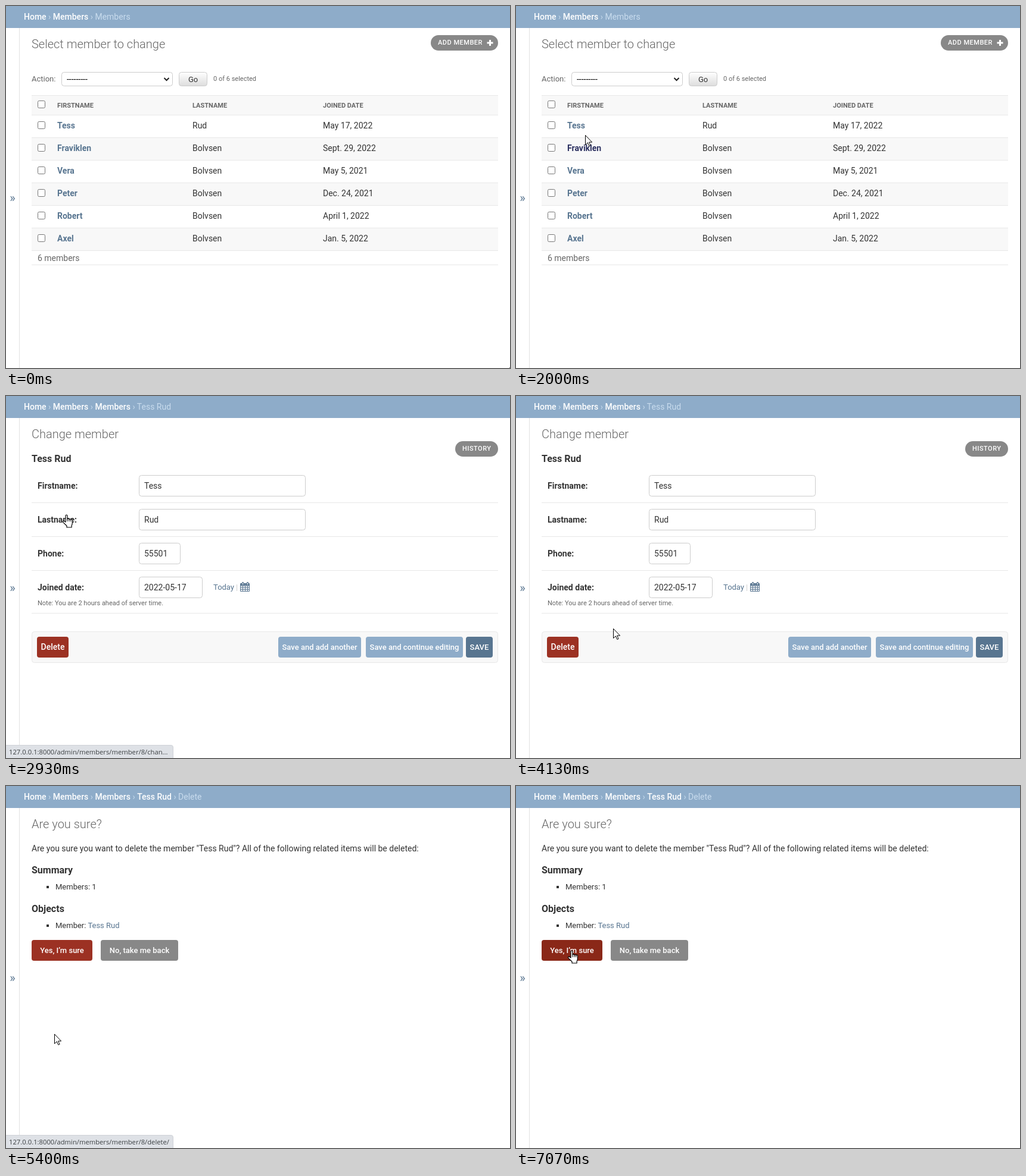
These frames come from a looping animation (846 by 609 pixels, 8000 ms). An HTML page:

```html
<!DOCTYPE html>
<html lang="en">
<head>
<meta charset="utf-8">
<title>Member admin</title>
<style>
html, body { margin: 0; width: 100%; height: 100%; overflow: hidden; background: #fff; }
svg { display: block; }
text { font-family: Roboto, sans-serif; white-space: pre; }
#status text { font-family: "Open Sans", "Noto Sans", sans-serif; }
</style>
</head>
<body>
<svg id="stage" width="846" height="609"></svg>
<script>
const BLUE = '#8eacc9', LINK = '#587590', HOVER = '#2b3060', RED = '#9c3123', DARK_RED = '#8a2818';
const GREY = '#888', INK = '#333', SOFT = '#666', PALE = '#c9dcee', LINE = '#e8e8e8', STRIPE = '#f8f8f8';
const FIRST = 'Tess', LAST = 'Rud', FULL = FIRST + ' ' + LAST;
const $ = id => document.getElementById(id);

const text = (x, y, str, size = 14, fill = INK, weight = 400, extra = '') =>
  `<text x="${x}" y="${y}" font-size="${size}" fill="${fill}" font-weight="${weight}" ${extra}>${str}</text>`;
const rect = (x, y, w, h, fill, r = 0, extra = '') =>
  `<rect x="${x}" y="${y}" width="${w}" height="${h}" fill="${fill}" rx="${r}" ${extra}/>`;
const frame = (x, y, w, h, fill = '#fff', r = 4, stroke = '#ccc') =>
  rect(x + .5, y + .5, w - 1, h - 1, fill, r, `stroke="${stroke}"`);
const rule = y => rect(43, y, 783, 1, LINE);
const title = str => text(43, 71, str, 20, SOFT, 300);
const check = y => frame(53, y, 13, 13, '#fff', 2, '#767676');
const button = (x, y, w, str, fill, size = 13, id = '') =>
  rect(x, y, w, 35, fill, 4, id && `id="${id}"`) +
  text(x + w / 2, y + 22, str, size, '#fff', 500, 'text-anchor="middle"');
const pill = (x, y, w, str) => rect(x, y, w, 26, GREY, 13) +
  text(x + 12, y + 16, str, 11, '#fff', 500, 'letter-spacing=".5"');
const crumbs = (...names) => text(30, 23, names.map((name, i) =>
  i < names.length - 1 ? `<tspan font-weight="500" fill="#fff">${name}</tspan> › ` : name).join(''), 14, PALE);

function listPage() {
  const rows = [
    [FIRST, LAST, 'May 17, 2022'], ['Fraviklen', 'Bolvsen', 'Sept. 29, 2022'],
    ['Vera', 'Bolvsen', 'May 5, 2021'], ['Peter', 'Bolvsen', 'Dec. 24, 2021'],
    ['Robert', 'Bolvsen', 'April 1, 2022'], ['Axel', 'Bolvsen', 'Jan. 5, 2022']];
  const head = (x, str) => text(x, 171, str, 11, SOFT, 700);
  return crumbs('Home', 'Members', 'Members') + title('Select member to change') +
    pill(713, 49, 113, 'ADD MEMBER') +
    '<path d="M807.5 62h10M812.5 57v10" stroke="#fff" stroke-width="3"/>' +
    text(43, 127, 'Action:', 13, SOFT) + frame(93, 111, 187, 24) + text(102, 128, '---------', 14, '#000') +
    '<path d="M265.5 121l4 4 4-4" fill="none" stroke="#222" stroke-width="2"/>' +
    frame(290, 111, 48, 24, 'url(#shade)') + text(306, 128, 'Go', 13) +
    text(348, 126, '0 of 6 selected', 11, SOFT) +
    rect(43, 150, 783, 34, STRIPE) + rule(150) + rule(183) + check(159) +
    head(86, 'FIRSTNAME') + head(313, 'LASTNAME') + head(532, 'JOINED DATE') +
    rows.map(([first, last, date], i) => {
      const y = 184 + 38 * i;
      return (i % 2 ? rect(43, y, 783, 37, STRIPE) : '') + rule(y + 37) + check(y + 10) +
        text(86, y + 22, first, 14, LINK, 700, `id="name${i}"`) +
        text(313, y + 22, last) + text(532, y + 22, date);
    }).join('') +
    text(53, 429, '6 members', 14, SOFT) + rule(435);
}

function editPage() {
  const field = (y, label, w, value) => text(53, y + 23, label + ':', 14, INK, 700) +
    frame(223, y, w, 36) +
    `<svg x="232" y="${y}" width="${w - 32}" height="36">${text(0, 23, value)}</svg>`;
  const calendar = '<g fill="none" stroke="' + LINK + '">' +
    '<path d="M393.5 315.5h15v13h-15zM393.5 319.5h15M393.5 322.5h15M393.5 325.5h15M397.5 319v9M401.5 319v9M405.5 319v9"/>' +
    '<path d="M394 317h14" stroke-width="3"/><path d="M397.5 313v4M405.5 313v4" stroke-width="3"/>' +
    '<path d="M397.5 314v3M405.5 314v3" stroke="#fff"/></g>';
  return crumbs('Home', 'Members', 'Members', FULL) + title('Change member') +
    pill(754, 76, 72, 'HISTORY') + text(43, 111, FULL, 16, INK, 700) +
    field(133, 'Firstname', 280, FIRST) + field(190, 'Lastname', 280, LAST) +
    field(247, 'Phone', 70, '55501') + field(304, 'Joined date', 107, '2022-05-17') +
    [179, 236, 293, 365].map(rule).join('') +
    text(348, 326, 'Today', 13, LINK) + text(386, 326, '|', 13, '#ccc') + calendar +
    text(53, 352, 'Note: You are 2 hours ahead of server time.', 11, SOFT) +
    frame(43, 396, 783, 53, STRIPE, 4, LINE) + button(52, 405, 53, 'Delete', RED, 14, 'delete') +
    button(457, 405, 139, 'Save and add another', BLUE) +
    button(604, 405, 163, 'Save and continue editing', BLUE) + button(772, 405, 45, 'SAVE', LINK);
}

function confirmPage() {
  const item = (y, str) => rect(68, y - 6, 4, 4, INK) + text(83, y, str, 13);
  return crumbs('Home', 'Members', 'Members', FULL, 'Delete') + title('Are you sure?') +
    text(43, 110, `Are you sure you want to delete the member "${FULL}"? ` +
      'All of the following related items will be deleted:') +
    text(43, 147, 'Summary', 16, INK, 700) + item(174, 'Members: 1') +
    text(43, 212, 'Objects', 16, INK, 700) + item(239, `Member: <tspan fill="${LINK}">${FULL}</tspan>`) +
    button(43, 259, 102, 'Yes, I’m sure', RED, 13, 'yes') + button(159, 259, 130, 'No, take me back', GREY);
}

$('stage').innerHTML =
  '<defs><linearGradient id="shade" x2="0" y2="1"><stop stop-color="#fff"/>' +
  '<stop offset="1" stop-color="#ddd"/></linearGradient></defs>' +
  rect(0, 0, 846, 37, BLUE) + rect(22, 37, 1, 572, '#e2e2e2') +
  text(11, 330, '»', 20, LINK, 400, 'text-anchor="middle"') +
  [listPage, editPage, confirmPage].map((page, i) => `<g id="page${i}">${page()}</g>`).join('') +
  '<g id="status"><path d="M-1 587.5H277q3.500 0 3.500 3.500V610H-1z" fill="#dee1e6" stroke="#cfd2d7"/>' +
  text(5, 603, '', 11.25, '#3c4043', 400, 'id="url"') + '</g>' +
  '<g id="pointer" fill="#fff" stroke="#000" stroke-linejoin="round">' +
  '<path id="arrow" d="M.5.5v16l3.800-3.600 2.500 5.600 2.300-1-2.500-5.400h5z"/>' +
  '<g id="hand" transform="translate(-5 -1)"><path stroke-width="1.2" d="M5 13V2.500a1.500 1.500 0 0 1 3 0V8.500' +
  'a1.500 1.500 0 0 1 3 .3a1.400 1.400 0 0 1 2.700.6a1.300 1.300 0 0 1 2.600.6V15q0 2-1.200 4v3H7' +
  'v-2.500L1.300 13.800q-1.500-2 .2-2.700 1-.3 2 .8z"/><path d="M8 8.500v3.500M11 9v3M13.700 10v2"/></g></g>';

// pointer path: time, x, y
const PATH = [
  [0, 845, 608], [667, 845, 608], [1600, 355, 348], [2000, 116, 217], [2400, 100, 200], [3533, 100, 200],
  [3733, 125, 232], [3933, 172, 315], [4133, 163, 391], [4400, 112, 412], [4667, 84, 418], [4800, 82, 418],
  [5333, 81, 417], [5867, 81, 417], [6133, 86, 385], [6467, 94, 339], [6733, 94, 289], [7067, 92, 277], [8000, 92, 277]];

function pointAt(t) {
  const i = Math.max(1, PATH.findIndex(p => p[0] >= t));
  const [t0, x0, y0] = PATH[i - 1], [t1, x1, y1] = PATH[i];
  const k = (t - t0) / (t1 - t0);
  return [Math.round(x0 + (x1 - x0) * k), Math.round(y0 + (y1 - y0) * k)];
}

const STEP = 200 / 3;
const within = (t, a, b) => t >= a && t < b;
const ramp = (t, a, b) => Math.min(1, Math.max(0, (t - a) / (b - a)));
const show = (id, on) => $(id).setAttribute('display', on ? 'inline' : 'none');
const paint = (id, fill) => $(id).setAttribute('fill', fill);

function draw(now) {
  const t = Math.floor((now % 8000 + 4) / STEP) * STEP + .01;
  const page = t < 2930 ? 0 : t < 5330 ? 1 : 2;
  for (let i = 0; i < 3; i++) show('page' + i, i === page);

  paint('name0', within(t, 2060, 2930) ? HOVER : LINK);
  paint('name1', within(t, 1930, 2060) ? HOVER : LINK);
  paint('delete', t > 4530 ? DARK_RED : RED);
  paint('yes', t > 6720 ? DARK_RED : RED);

  const [x, y] = pointAt(t);
  const hand = within(t, 2060, 3590) || within(t, 4530, 5390) || t > 6720;
  $('pointer').setAttribute('transform', `translate(${x} ${y})`);
  show('hand', hand);
  show('arrow', !hand);

  const opacity = t < 4000 ? ramp(t, 2260, 2535) - ramp(t, 3065, 3330) : ramp(t, 4865, 5065) - ramp(t, 5600, 5865);
  $('status').setAttribute('opacity', opacity);
  $('url').textContent = '127.0.0.1:8000/admin/members/member/8/' + (t < 4000 ? 'chan...' : 'delete/');
}

const start = performance.now();
(function loop() {
  draw(performance.now() - start);
  requestAnimationFrame(loop);
})();
</script>
</body>
</html>
```
